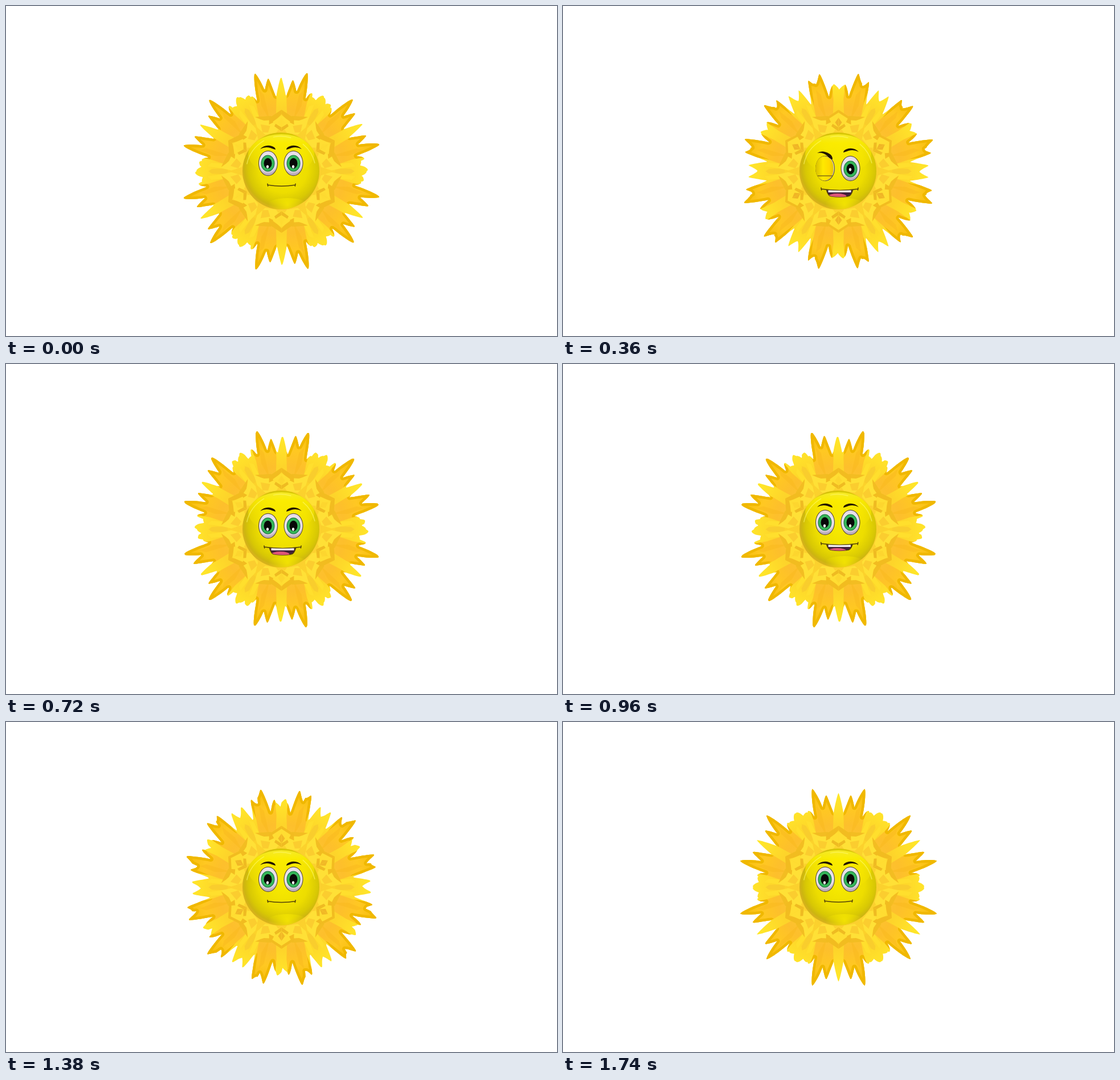
An HTML page with a canvas for the animation above (1.8 s loop, 967 px wide and 579 px high).

```html
<!DOCTYPE html>
<html lang="en">
<head>
<meta charset="utf-8">
<title>Winking sun</title>
<style>
html, body { margin: 0; width: 100%; height: 100%; overflow: hidden; background: #fff; }
canvas { display: block; }
</style>
</head>
<body>
<canvas id="stage" width="967" height="579"></canvas>
<script>
const ctx = document.getElementById('stage').getContext('2d');
const LOOP = 1800, STEP = 60, CX = 483.5, CY = 290;
const RAD = Math.PI / 180;

// Radius of ray tips and of the dips between them, every 3.75 degrees of a mirrored sector
const TIP = [166, 152, 163, 175, 179, 167, 142, 159, 150];
const DIP = [144, 131, 131, 143, 158, 130, 126, 140, 142];

const mix = (a, b, k) => a + (b - a) * k;

function keyed(t, keys) {
  for (let i = 1; i < keys.length; i++) {
    const [t0, v0] = keys[i - 1], [t1, v1] = keys[i];
    if (t <= t1) return mix(v0, v1, (t - t0) / (t1 - t0));
  }
  return keys[keys.length - 1][1];
}

function sample(list, deg) {
  let d = ((deg % 60) + 60) % 60;
  if (d > 30) d = 60 - d;
  const x = d / 3.75, i = Math.min(7, Math.floor(x));
  return mix(list[i], list[i + 1], x - i);
}

// 48 teeth turn slowly inside a fixed six-fold envelope
function radius(deg, turn) {
  const x = (deg - turn) / 7.5;
  const d = Math.abs(x - Math.round(x)) * 2;
  const soft = Math.max(0, (Math.hypot(d, 0.12) - 0.1) / 0.907);
  return mix(sample(TIP, deg), sample(DIP, deg), soft);
}

const polar = (deg, r) => [r * Math.sin(deg * RAD), -r * Math.cos(deg * RAD)];

function outline(turn) {
  const path = new Path2D();
  for (let d = 0; d < 360; d += 0.375) path.lineTo(...polar(d, radius(d, turn)));
  path.closePath();
  return path;
}

function shape(points) {
  const path = new Path2D();
  for (const [d, r] of points) path.lineTo(...polar(d, r));
  path.closePath();
  return path;
}

function fill(points, color) {
  ctx.fillStyle = color;
  ctx.fill(shape(points));
}

function mirrored(draw) {
  for (let k = 0; k < 6; k++) {
    for (const side of [1, -1]) {
      ctx.save();
      ctx.rotate(k * 60 * RAD);
      ctx.scale(side, 1);
      draw();
      ctx.restore();
    }
  }
}

function radial(x, y, r0, r1, stops) {
  const g = ctx.createRadialGradient(x, y, r0, x, y, r1);
  stops.forEach(([at, color]) => g.addColorStop(at, color));
  return g;
}

function drawRays(turn) {
  const edge = outline(turn);
  const bend = (1 - Math.cos(turn / 7.5 * 2 * Math.PI)) / 2;
  ctx.save();
  ctx.translate(CX, CY);
  ctx.fillStyle = radial(0, 0, 65, 165, [[0, '#fbd02e'], [0.45, '#fdd42a'], [0.75, '#ffe02a'], [1, '#ffe828']]);
  ctx.fill(edge);

  // orange rays
  const rays = new Path2D();
  const ray = shape([[4.6, 200], [20.4, 200], [20.4, 128], [23, 98], [14, 80], [6, 94], [4, 126]]);
  for (let k = 0; k < 6; k++) {
    for (const side of [1, -1]) {
      rays.addPath(ray, new DOMMatrix().rotate(k * 60).scale(side, 1));
    }
  }
  ctx.save();
  ctx.clip(rays);
  ctx.fillStyle = radial(0, 0, 80, 180, [[0, '#fcc531'], [0.3, '#fdbf2c'], [0.6, '#ffc822'], [0.8, '#f9c115'], [1, '#eeb500']]);
  ctx.fill(edge);
  ctx.clip(edge);
  ctx.strokeStyle = '#f0b800';
  ctx.lineWidth = 9;
  ctx.lineJoin = 'round';
  ctx.stroke(edge);
  ctx.restore();

  mirrored(() => {
    fill([[13, 138], [15.5, 148], [17, 120], [13, 92]], 'rgba(250,185,30,.5)');
    fill([[23, 124], [26, 130], [28, 96], [22, 90]], '#ffdf2d');
    fill([[28, 122], [30, 128], [30, 94], [27, 96]], '#f9cd2d');
    fill([[3, 85], [11, 99], [26, 106], [19, 93], [9, 87]], '#f3bd22');
    fill([[2, 77], [8, 91], [19, 94], [27, 106], [29, 88], [24, 70], [8, 68]], '#ffe036');
    fill([[14, 82], [24, 90], [26, 76], [19, 72]], '#fbcd2f');
    fill([[0, 108], [13, 96], [15, 85], [9, 87], [0, mix(100, 103, bend)]], '#f2bc20');
    fill([[0, mix(98, 103, bend)], [10, mix(88, 94, bend)], [5, 73], [0, 70]], '#ffdd32');
    fill([[0, 77], [7, 84], [9, 80], [0, 70]], '#efbb22');
    ctx.globalAlpha = bend;
    fill([[0, 94], [4, 86], [0, 77]], '#f0b426');
    ctx.globalAlpha = 1;
  });
  ctx.restore();
}

function ellipse(x, y, rx, ry, color) {
  ctx.fillStyle = color;
  ctx.beginPath();
  ctx.ellipse(x, y, rx, ry, 0, 0, 2 * Math.PI);
  ctx.fill();
}

function drawBall() {
  const x = 482.5, y = 289.5, r = 67.5;
  ellipse(x, y, r, r, radial(x + 4, y - 5, 8, 72, [[0, '#f6e900'], [0.55, '#eddd00'], [0.82, '#d8c804'], [0.94, '#cdb510'], [1, '#d6b21c']]));
  ctx.save();
  ctx.clip();
  const shine = ctx.createLinearGradient(0, 223, 0, 292);
  shine.addColorStop(0, 'rgba(255,245,60,.75)');
  shine.addColorStop(0.25, 'rgba(255,240,0,.8)');
  shine.addColorStop(1, 'rgba(255,235,0,0)');
  ellipse(483, 260, 58, 35, shine);
  ellipse(494, 349, 36, 12, radial(494, 349, 0, 34, [[0, 'rgba(255,240,0,.7)'], [1, 'rgba(255,240,0,0)']]));
  ctx.strokeStyle = 'rgba(255,248,110,.6)';
  ctx.lineWidth = 1.5;
  for (const [from, to] of [[3.35, 4.2], [4.5, 5], [5.4, 6.05]]) {
    ctx.beginPath();
    ctx.arc(x, y, 61, from, to);
    ctx.stroke();
  }
  ctx.restore();
}

function drawEye(x, y, gaze) {
  ellipse(x, y, 17, 22.3, '#514331');
  ellipse(x, y, 16, 21.3, radial(x - 1, y - 3, 4, 22, [[0, '#f4eff4'], [0.7, '#e6dce8'], [1, '#b9aab8']]));
  const ix = x + (x < 483 ? -0.5 : 0);
  ellipse(ix, y + gaze, 12, 14.6, '#176f39');
  ellipse(ix, y + gaze, 11, 13.6, '#36b659');
  ellipse(ix, y + gaze, 7, 9.2, '#080808');
  ellipse(ix - 0.5, y + mix(6, 2, gaze), 2.1, 2.8, '#fff');
}

function drawLid(x, y) {
  const g = ctx.createLinearGradient(x - 17, 0, x + 16, 0);
  g.addColorStop(0, '#d6bd00');
  g.addColorStop(0.4, '#ffe900');
  g.addColorStop(0.75, '#ffd800');
  g.addColorStop(1, '#dcc300');
  ellipse(x - 1, y, 16, 21.5, g);
  ctx.strokeStyle = '#806b12';
  ctx.lineWidth = 1.4;
  ctx.beginPath();
  ctx.moveTo(x - 13, y + 13);
  ctx.lineTo(x + 13, y + 13);
  ctx.stroke();
}

function drawBrow(x, y, side, wink) {
  ctx.save();
  ctx.translate(x, y);
  ctx.scale(side, 1);
  ctx.fillStyle = '#231500';
  ctx.beginPath();
  ctx.moveTo(-14, mix(3, 5, wink));
  ctx.quadraticCurveTo(-5, mix(-6, -1, wink), 7, mix(-2, 6, wink));
  ctx.quadraticCurveTo(13, mix(0, 9, wink), 13, mix(4, 16, wink));
  ctx.quadraticCurveTo(9, mix(3, 16, wink), 4, mix(1, 10, wink));
  ctx.quadraticCurveTo(-5, mix(-2, 3, wink), -14, mix(3, 5, wink));
  ctx.fill();
  ctx.restore();
}

function drawMouth(y, open) {
  const half = mix(24.5, 32.5, Math.min(1, open * 1.15));
  const x = mix(483.5, 485.5, open), w = mix(20, 23, open), h = 12 * open;
  ctx.strokeStyle = '#51400a';
  ctx.lineWidth = 1.5;
  ctx.lineCap = 'round';
  ctx.beginPath();
  ctx.moveTo(x - half, y - 1);
  ctx.quadraticCurveTo(x, y + mix(3, 4, open), x + half, y - 1);
  for (const s of [-1, 1]) {
    ctx.moveTo(x + s * half, y - 3);
    ctx.lineTo(x + s * (half - 0.7), y + 1);
  }
  ctx.stroke();
  if (open < 0.04) return;
  ctx.save();
  ctx.beginPath();
  ctx.moveTo(x - w, y + 1);
  ctx.quadraticCurveTo(x, y + 2.5, x + w, y + 1);
  ctx.quadraticCurveTo(x + w - 3, y + h, x + w - 9, y + h);
  ctx.quadraticCurveTo(x, y + h + 2, x - w + 9, y + h);
  ctx.quadraticCurveTo(x - w + 3, y + h, x - w, y + 1);
  ctx.fillStyle = '#42203a';
  ctx.fill();
  ctx.stroke();
  ctx.clip();
  ellipse(x - 4, y + 12, 16, 5, '#dc5578');
  ctx.fillStyle = '#f3eef2';
  ctx.fillRect(x - w + 3, y + 1, w * 2 - 6, 4);
  ctx.restore();
}

function drawFace(t) {
  const drop = keyed(t, [[0, 0], [60, 0], [360, 9], [600, 9], [720, 8], [960, 2], [1080, 0], [LOOP, 0]]);
  const brow = keyed(t, [[0, 0], [60, 0], [360, 5], [600, 7], [720, 7], [960, 0], [LOOP, 0]]);
  const wink = keyed(t, [[0, 0], [180, 0], [300, 1], [480, 1], [600, 0], [LOOP, 0]]);
  const open = keyed(t, [[0, 0], [60, 0], [300, 1], [720, 1], [960, 0.88], [1200, 0.36], [1380, 0], [LOOP, 0]]);
  const lip = keyed(t, [[0, 315], [60, 315], [360, 322], [720, 322], [960, 316], [LOOP, 315]]);
  const y = 276 + drop;

  drawEye(460, y, wink);
  if (wink > 0) {
    ctx.save();
    ctx.beginPath();
    ctx.rect(440, y - 24, 40, 48 * wink);
    ctx.clip();
    drawLid(460, y);
    ctx.restore();
  }
  drawEye(504.5, y, wink);
  drawBrow(460, 248 + brow, 1, wink);
  drawBrow(505, 248 + brow, -1, 0);
  drawMouth(lip, open);
}

function render(now) {
  const step = Math.floor((now % LOOP) / STEP);
  ctx.fillStyle = '#fff';
  ctx.fillRect(0, 0, 967, 579);
  drawRays(-0.5 * (step + 1));
  drawBall();
  drawFace(step * STEP);
}

let start;
function tick(now) {
  if (start === undefined) start = now;
  render(now - start);
  requestAnimationFrame(tick);
}
render(0);
requestAnimationFrame(tick);
</script>
</body>
</html>
```
